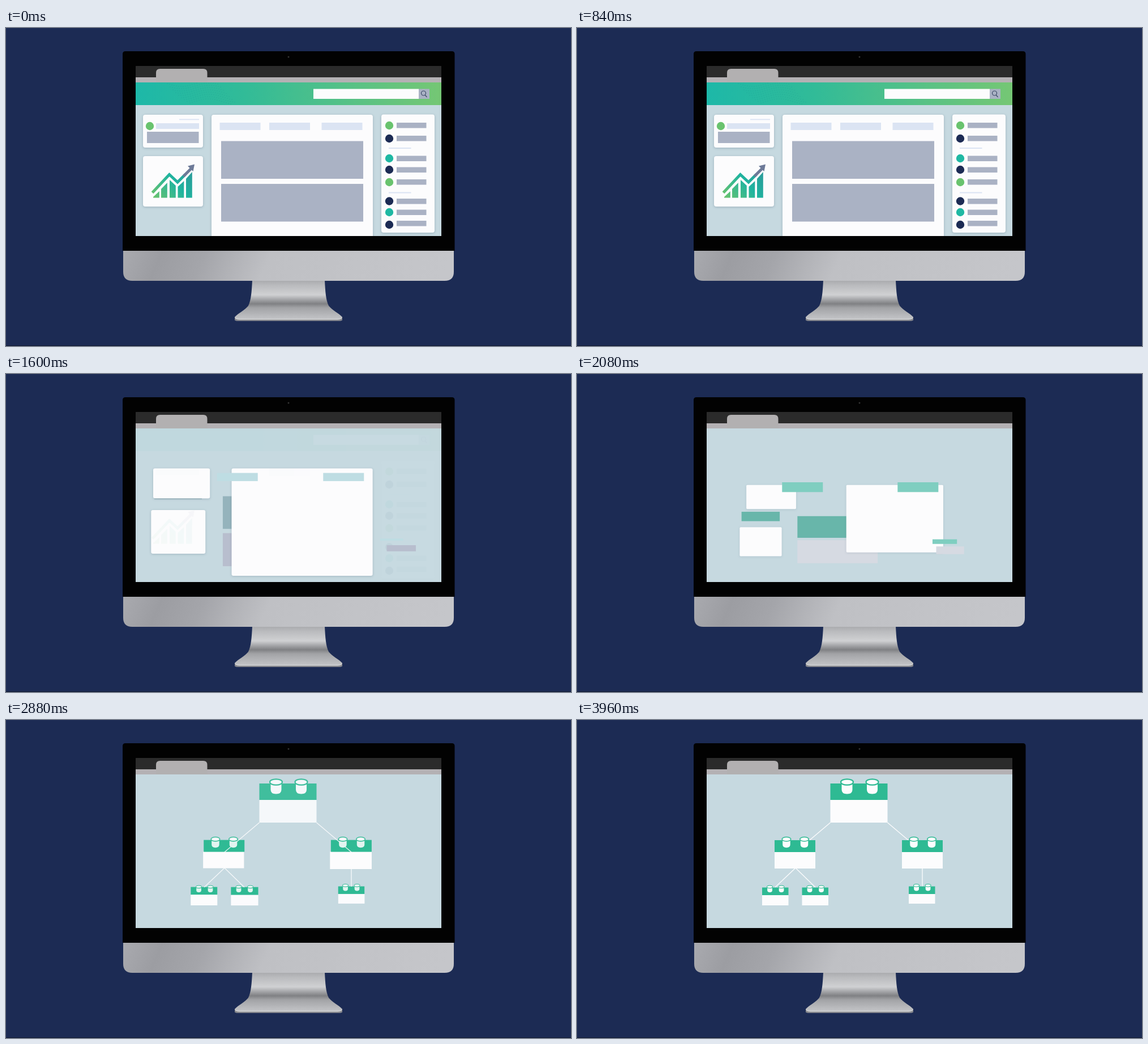
Write an HTML page that moves like this. It is 998x561 px and loops after 4000 ms.

```html
<!DOCTYPE html>
<html lang="en">
<head>
<meta charset="utf-8">
<title>Page to blocks</title>
<style>
html, body { margin: 0; width: 100%; height: 100%; overflow: hidden; background: #1c2b54; }
svg { display: block; width: 100%; height: 100%; }
</style>
</head>
<body>
<svg viewBox="0 0 998 561" xmlns="http://www.w3.org/2000/svg">
  <defs>
    <clipPath id="screen"><rect x="229" y="67" width="540" height="300"/></clipPath>
    <linearGradient id="header">
      <stop offset="0" stop-color="#1db8a8"/><stop offset=".35" stop-color="#31bb98"/>
      <stop offset=".75" stop-color="#5cc283"/><stop offset="1" stop-color="#75c774"/>
    </linearGradient>
    <linearGradient id="growth" gradientUnits="userSpaceOnUse" x1="260" y1="300" x2="320" y2="250">
      <stop offset="0" stop-color="#6cc36c"/><stop offset=".6" stop-color="#1fb49f"/><stop offset="1" stop-color="#2a9d9a"/>
    </linearGradient>
    <linearGradient id="chin" x1="0" y1="0" x2="1" y2=".04">
      <stop offset="0" stop-color="#a9aaaf"/><stop offset=".12" stop-color="#9c9da2"/>
      <stop offset=".25" stop-color="#a4a5aa"/><stop offset=".45" stop-color="#bfc0c4"/>
      <stop offset="1" stop-color="#c5c6ca"/>
    </linearGradient>
    <linearGradient id="stand" x1="0" y1="0" x2="0" y2="1">
      <stop offset="0" stop-color="#a9aaad"/><stop offset=".12" stop-color="#b9babd"/>
      <stop offset=".36" stop-color="#d0d1d3"/><stop offset=".48" stop-color="#a3a4a7"/>
      <stop offset=".58" stop-color="#808184"/><stop offset=".68" stop-color="#a2a3a6"/>
      <stop offset=".9" stop-color="#bcbdc0"/><stop offset="1" stop-color="#c8c9cc"/>
    </linearGradient>
  </defs>

  <rect width="998" height="561" fill="#1c2b54"/>
  <rect y="560" width="998" height="1" fill="#10182f"/>

  <path d="M435 445H563C564 465 565 480 570 490C576 498 588 503 594 510V514Q594 516.500 590 516.500H408Q404 516.500 404 514V510C410 503 422 498 428 490C433 480 434 465 435 445Z" fill="url(#stand)"/>
  <path d="M404 511Q406 514 412 514H586Q592 514 594 511V514Q594 516.500 590 516.500H408Q404 516.500 404 514Z" fill="#85868a"/>
  <path d="M405 512Q408 514 412 514H586Q590 514 593 512" fill="none" stroke="#e2e3e5"/>
  <path d="M207 392H791V430Q791 446 775 446H223Q207 446 207 430Z" fill="url(#chin)"/>
  <path d="M206 393V46Q206 41 211 41H787.500Q792.500 41 792.500 46V393Z" fill="#020202"/>
  <circle cx="499" cy="51" r="1.500" fill="#343434"/>

  <g clip-path="url(#screen)">
    <rect x="229" y="67" width="540" height="300" fill="#c6d9e0"/>
    <rect x="229" y="67" width="540" height="20" fill="#2b2b2b"/>
    <rect x="229" y="87" width="540" height="9" fill="#b4b1b4"/>
    <path d="M265 96V79Q265 72 272 72H348.500Q355.500 72 355.500 79V96Z" fill="#b2b0b1"/>
    <g id="page"></g>
    <g id="back"></g>
    <g id="cards"></g>
    <g id="detail"></g>
    <g id="front"></g>
    <g id="tree"></g>
  </g>
</svg>
<script>
const LOOP = 4000, MORPH = 1090, SPAN = 1900, SINK = 1480;
const WHITE = '#fcfcfd', GREY = '#aab2c4', PALE = '#dbe4f3', GREEN = '#2eba93';
const LEAF = '#69c36e', NAVY = '#1c2b54', TEAL = '#1fb8a3';

const $ = id => document.getElementById(id);
const clamp = v => Math.min(1, Math.max(0, v));
const ramp = (t, a, b) => clamp((t - a) / (b - a));
const mix = (a, b, p) => a + (b - a) * p;
const rgb = hex => [1, 3, 5].map(i => parseInt(hex.slice(i, i + 2), 16));

function add(parent, tag, attrs) {
  const el = document.createElementNS('http://www.w3.org/2000/svg', tag);
  for (const k in attrs) el.setAttribute(k, attrs[k]);
  return parent.appendChild(el);
}
const rect = (g, x, y, width, height, fill, rx = 0) => add(g, 'rect', { x, y, width, height, fill, rx });
const dot = (g, cx, cy, r, fill) => add(g, 'circle', { cx, cy, r, fill });
const path = (g, d, attrs) => add(g, 'path', { d, ...attrs });

function drawPage(g) {
  rect(g, 229, 96, 540, 40, 'url(#header)');
  // faint dotted waves
  for (let row = 0; row < 9; row++) {
    for (let i = 0; i < 22; i++) {
      const x = 285 + row * 5 + i * 4, y = 98 + row * 4 + 5 * Math.sin(i / 4 + row / 3);
      if (y > 97 && y < 134) add(g, 'circle', { cx: x, cy: y, r: .6, fill: '#16828f', opacity: .3 });
    }
  }
  rect(g, 543, 107.5, 186, 17.5, WHITE);
  rect(g, 729, 107.5, 19, 17.5, GREY);
  path(g, 'M740.5 118.500L743.500 122M741.500 115A4 4 0 1 1 733.500 115A4 4 0 1 1 741.500 115Z',
    { fill: 'none', stroke: '#3b4767', 'stroke-width': 1.2 });

  const panel = rect(g, 663, 152.5, 94, 208.5, WHITE, 4);
  panel.style.filter = 'drop-shadow(0 1px 2px rgba(40,70,90,.28))';
  [[172, LEAF], [195, NAVY], [230, TEAL], [250, NAVY], [272, LEAF], [305.5, NAVY], [325, TEAL], [347, NAVY]]
    .forEach(([y, fill]) => dot(g, 677, y, 7.2, fill));
  [167, 190, 225.5, 245.5, 267, 320.5, 340].forEach(y => rect(g, 690, y, 52.5, 9.5, GREY));
  rect(g, 676, 211, 39.5, 2, PALE);
}

function drawDetail(g) {
  rect(g, 306, 160.5, 35, 1.8, PALE);
  rect(g, 265, 168, 76, 10, PALE);
  rect(g, 465, 167, 72, 13, PALE);
  const fill = 'url(#growth)';
  [[260, 298, 288], [274, 284, 273], [289, 268, 278], [303.5, 280, 270], [318, 266, 254]]
    .forEach(([x, l, r]) => path(g, `M${x} 299.500V${l}L${x + 10.8} ${r}V299.500Z`, { fill }));
  path(g, 'M258.500 290.500L288.500 258.500L303 272L317 258',
    { fill: 'none', stroke: fill, 'stroke-width': 5 });
  path(g, 'M303 272L328 247', { fill: 'none', stroke: '#6d7a98', 'stroke-width': 5, 'stroke-dasharray': '0 15 30' });
  path(g, 'M333 240.500L330.500 253L321 243.500Z', { fill: '#6d7a98' });
}

function drawLines(g) {
  path(g, 'M447.500 181L386 233M548.500 181L610 233M386 261L350 295M386 261L421 295M610 262V294',
    { fill: 'none', stroke: WHITE, 'stroke-width': 1.3 });
}

function drawStuds(g, x, y, s) {
  const k = add(g, 'g', { transform: `translate(${x} ${y}) scale(${s})` });
  for (const cx of [29.5, 74]) {
    path(k, `M${cx - 9.5} -2V11Q${cx - 9.5} 18.500 ${cx} 18.500Q${cx + 9.5} 18.500 ${cx + 9.5} 11V-2Z`, { fill: WHITE });
    add(k, 'ellipse', { cx, cy: -2.5, rx: 11, ry: 5.2, fill: WHITE, stroke: GREEN, 'stroke-width': 2.2 });
  }
}

// each mover: box and colour at both ends, layer, time it drops behind the cards
const movers = [];
function mover(layer, from, to, c0, c1, opts = {}) {
  const el = rect($(layer), ...from, c0);
  movers.push({ el, layer, from, to, c0: rgb(c0), c1: rgb(c1), ...opts });
}

const page = $('page'), detail = $('detail'), front = $('front'), tree = $('tree');
drawPage(page);
drawDetail(detail);
const avatar = dot(front, 254, 173, 7.2, LEAF);

const card = { card: true };
mover('cards', [242, 153, 106, 58], [349, 233, 72, 29], WHITE, WHITE, card);
mover('cards', [242, 226, 106, 89], [327, 309, 46.5, 18], WHITE, WHITE, card);
mover('cards', [363, 153, 285, 222], [574, 233, 72, 29], WHITE, WHITE, card);
mover('front', [249, 183, 91.5, 20], [327, 295.5, 46.5, 13.5], GREY, GREEN, { sink: MORPH });
mover('front', [380, 199.5, 251, 66.5], [397.5, 295.5, 46.5, 13.5], GREY, GREEN, { sink: SINK });
mover('front', [380, 275, 251, 66.5], [397.5, 309, 46.5, 18], GREY, WHITE, { sink: SINK });
mover('front', [377.5, 167, 72, 13], [349, 212, 72, 21], PALE, GREEN);
mover('front', [557.5, 167, 72, 13], [574, 212, 72, 21], PALE, GREEN);
mover('front', [690, 301, 52.5, 9.5], [586, 307, 46.5, 17], GREY, WHITE);
mover('front', [676, 289.5, 39.5, 2], [586, 293.5, 46.5, 13.5], PALE, GREEN);

const under = add($('back'), 'g', {});
drawLines(under);
const over = add(tree, 'g', {});
drawLines(over);
rect(tree, 447.5, 112, 101, 29, GREEN);
rect(tree, 447.5, 141, 101, 40, WHITE);
drawStuds(tree, 447.5, 112, 1);
[349, 574].forEach(x => drawStuds(tree, x, 212, .71));
[[327, 295.5], [397.5, 295.5], [586, 293]].forEach(([x, y]) => drawStuds(tree, x, y, .46));

function draw(t) {
  const p = (1 - Math.cos(Math.PI * ramp(t, MORPH, MORPH + SPAN))) / 2;
  for (const m of movers) {
    const box = m.from.map((v, i) => mix(v, m.to[i], p));
    ['x', 'y', 'width', 'height'].forEach((k, i) => m.el.setAttribute(k, box[i]));
    m.el.setAttribute('fill', `rgb(${m.c0.map((v, i) => Math.round(mix(v, m.c1[i], p)))})`);
    if (m.card) {
      m.el.setAttribute('rx', 4 * (1 - p));
      m.el.style.filter = p < 1 ? `drop-shadow(0 1px 2px rgba(40,70,90,${.28 * (1 - p)}))` : 'none';
    }
    if (m.sink) {
      const home = t >= m.sink ? $('back') : front;
      if (m.el.parentNode !== home) home.appendChild(m.el);
    }
  }
  const old = 1 - ramp(t, 1200, 1615);
  page.setAttribute('opacity', old);
  detail.setAttribute('opacity', old);
  avatar.setAttribute('opacity', t < MORPH ? 1 : 0);

  const done = t >= MORPH + SPAN;
  tree.setAttribute('opacity', ramp(t, 2530, 2930));
  over.setAttribute('opacity', done ? 0 : 1);
  under.setAttribute('opacity', done ? 1 : 0);
}

const start = performance.now();
function tick() {
  draw((performance.now() - start) % LOOP);
  requestAnimationFrame(tick);
}
tick();
</script>
</body>
</html>
```
